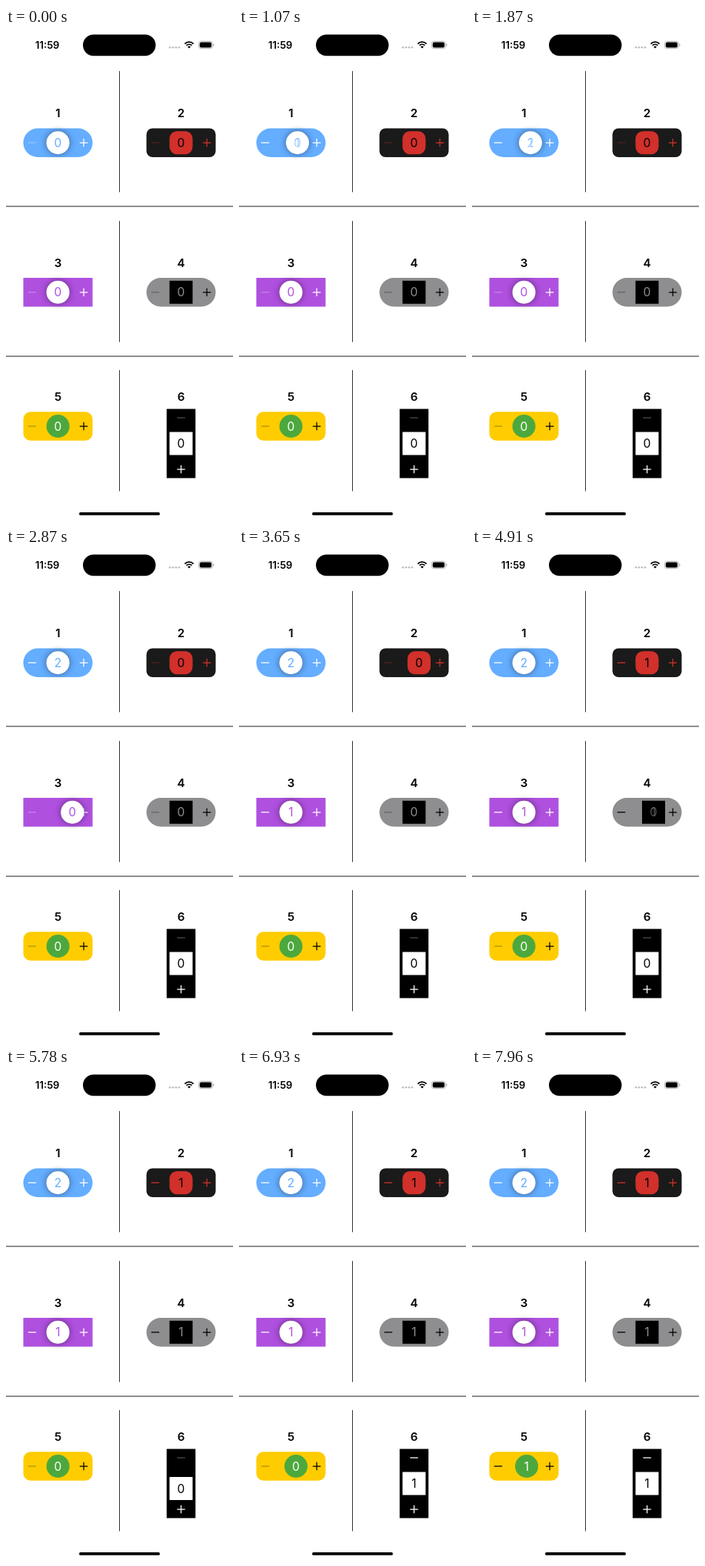
Animation of 295 by 640 pixels, one loop 8000 ms. Source, as an HTML page with a canvas:

```html
<!DOCTYPE html>
<html lang="en">
<head>
<meta charset="utf-8">
<title>Slide steppers</title>
<style>
  html, body { margin: 0; width: 100%; height: 100%; overflow: hidden; background: #fff; }
  canvas { display: block; width: 295px; height: 640px; }
</style>
</head>
<body>
<canvas id="stage"></canvas>
<script>
const WIDTH = 295, HEIGHT = 640, LOOP = 8000;
const canvas = document.getElementById('stage');
const ctx = canvas.getContext('2d');
const ratio = window.devicePixelRatio || 1;
canvas.width = WIDTH * ratio;
canvas.height = HEIGHT * ratio;

const BLUE = '#64adff', RED = '#d2302a', PURPLE = '#af50df', GRAY = '#8e8e90';
const LENGTH = 90, DEPTH = 37.5, KNOB = 30, ARM = 33.5;

const steppers = [
  { x: 67.5, y: 149.25, label: 111, radius: 18.75, track: BLUE, knob: '#fff', round: 15, ink: BLUE, sign: '#fff', shadow: true },
  { x: 227.5, y: 149.25, label: 111, radius: 8, track: '#1a1a1a', knob: RED, round: 9.5, ink: '#000', sign: RED },
  { x: 67.5, y: 343.75, label: 306, radius: 0, track: PURPLE, knob: '#fff', round: 15, ink: PURPLE, sign: '#fff', shadow: true },
  { x: 227.5, y: 343.75, label: 306, radius: 18.75, track: GRAY, knob: '#000', round: 0, ink: GRAY, sign: '#000' },
  { x: 67.5, y: 518, label: 480, radius: 9.5, track: '#ffcc00', knob: '#4ca83d', round: 15, ink: '#fff', sign: '#000' },
  { x: 227.5, y: 540.5, label: 480, radius: 0, track: '#000', knob: '#fff', round: 0, ink: '#000', sign: '#fff', vertical: true }
];

// Knob offsets while pulled, swapping the value, and settled again.
const PULL = [14, 18.7], SWAP = 8.5;
const drags = [
  { stepper: 0, touch: [[500, 6]], times: [860, 970, 1070, 1170] },
  { stepper: 0, touch: [[1440, 6]], times: [1650, 1760, 1870, 1970] },
  { stepper: 2, touch: [[2460, 3.5], [2560, 6.5]], times: [2750, 2870, 2990, 3090] },
  { stepper: 1, touch: [[3650, 6.5]], times: [3760, 3870, 3980, 4080] },
  { stepper: 3, touch: [], times: [4700, 4800, 4910, 5010] },
  { stepper: 5, touch: [[5780, 6.5]], times: [5890, 6000, 6110, 6210] },
  { stepper: 4, touch: [[6930, 6.5]], times: [7200, 7310, 7420, 7520] },
  { stepper: 4, touch: [[7960, 3.5]], times: [] }
];

function stateAt(index, time) {
  const state = { offset: 0, value: 0, swapping: false };
  for (const { stepper, touch, times } of drags) {
    if (stepper !== index) continue;
    for (const [start, offset] of touch) if (time >= start) state.offset = offset;
    const [pull, far, swap, settle] = times;
    if (time >= pull) state.offset = PULL[0];
    if (time >= far) state.offset = PULL[1];
    if (time >= swap) {
      state.value++;
      state.offset = time < settle ? SWAP : 0;
      state.swapping = time < settle;
      for (const [start, offset] of touch) if (start > settle && time >= start) state.offset = offset;
    }
  }
  return state;
}

function box(x, y, w, h, radius, color) {
  ctx.fillStyle = color;
  ctx.beginPath();
  ctx.roundRect(x, y, w, h, radius);
  ctx.fill();
}

function text(string, x, y, size, weight, color) {
  ctx.font = `${weight} ${size}px Inter, "Liberation Sans", sans-serif`;
  ctx.textAlign = 'center';
  ctx.fillStyle = color;
  ctx.fillText(string, x, y + size * 0.364);
}

function sign(x, y, color, plus) {
  ctx.strokeStyle = color;
  ctx.lineWidth = 1.25;
  ctx.beginPath();
  ctx.moveTo(x - 5.2, y);
  ctx.lineTo(x + 5.2, y);
  if (plus) {
    ctx.moveTo(x, y - 5.2);
    ctx.lineTo(x, y + 5.2);
  }
  ctx.stroke();
}

function drawStepper(s, index, time) {
  const { offset, value, swapping } = stateAt(index, time);
  const dx = s.vertical ? 0 : 1, dy = 1 - dx;
  const w = dx ? LENGTH : DEPTH, h = dx ? DEPTH : LENGTH;
  text(index + 1, s.x, s.label, 15, 600, '#000');
  box(s.x - w / 2, s.y - h / 2, w, h, s.radius, s.track);
  ctx.globalAlpha = value ? 1 : 0.3;
  sign(s.x - ARM * dx, s.y - ARM * dy, s.sign, false);
  ctx.globalAlpha = 1;
  sign(s.x + ARM * dx, s.y + ARM * dy, s.sign, true);

  const x = s.x + offset * dx, y = s.y + offset * dy;
  ctx.save();
  if (s.shadow) {
    ctx.shadowColor = 'rgba(0, 0, 0, 0.45)';
    ctx.shadowBlur = 8 * ratio;
  }
  box(x - KNOB / 2, y - KNOB / 2, KNOB, KNOB, s.round, s.knob);
  ctx.restore();
  ctx.globalAlpha = swapping ? 0.55 : 1;
  if (swapping) text(value - 1, x, y, 15.5, 400, s.ink);
  text(value, x, y, 15.5, 400, s.ink);
  ctx.globalAlpha = 1;
}

function drawStatusBar() {
  text('11:59', 53.7, 22, 13, 600, '#000');
  box(100, 8.5, 94.5, 27.7, 13.85, '#000');
  for (let i = 0; i < 4; i++) box(211.7 + i * 4, 23.9, 2.6, 2.6, 1.3, '#bdbdbd');

  ctx.strokeStyle = '#000';
  ctx.lineWidth = 1.8;
  for (const radius of [8, 4.9]) {
    ctx.beginPath();
    ctx.arc(238, 26.2, radius, -Math.PI * 0.75, -Math.PI * 0.25);
    ctx.stroke();
  }
  ctx.fillStyle = '#000';
  ctx.beginPath();
  ctx.moveTo(238, 26.5);
  ctx.arc(238, 26.5, 2.8, -Math.PI * 0.75, -Math.PI * 0.25);
  ctx.fill();

  ctx.strokeStyle = '#a6a6a6';
  ctx.lineWidth = 0.8;
  ctx.beginPath();
  ctx.roundRect(250.4, 17.3, 18, 9.4, 3);
  ctx.stroke();
  box(251.7, 18.6, 15.4, 6.8, 2, '#000');
  box(269.3, 20.4, 1.1, 3.2, 0.6, '#a6a6a6');
}

function drawGrid() {
  for (const y of [56, 251, 445]) box(147, y, 1, 157.5, 0, '#333');
  for (const y of [231.5, 426.5]) box(0, y, WIDTH, 1, 0, '#222');
  box(95, 630, 105, 3.8, 1.9, '#000');
}

function render(now) {
  const time = now % LOOP;
  ctx.setTransform(ratio, 0, 0, ratio, 0, 0);
  box(0, 0, WIDTH, HEIGHT, 0, '#fff');
  drawStatusBar();
  drawGrid();
  steppers.forEach((s, index) => drawStepper(s, index, time));
}

let start;
function tick(now) {
  start ??= now;
  render(now - start);
  requestAnimationFrame(tick);
}
render(0);
requestAnimationFrame(tick);
</script>
</body>
</html>
```
